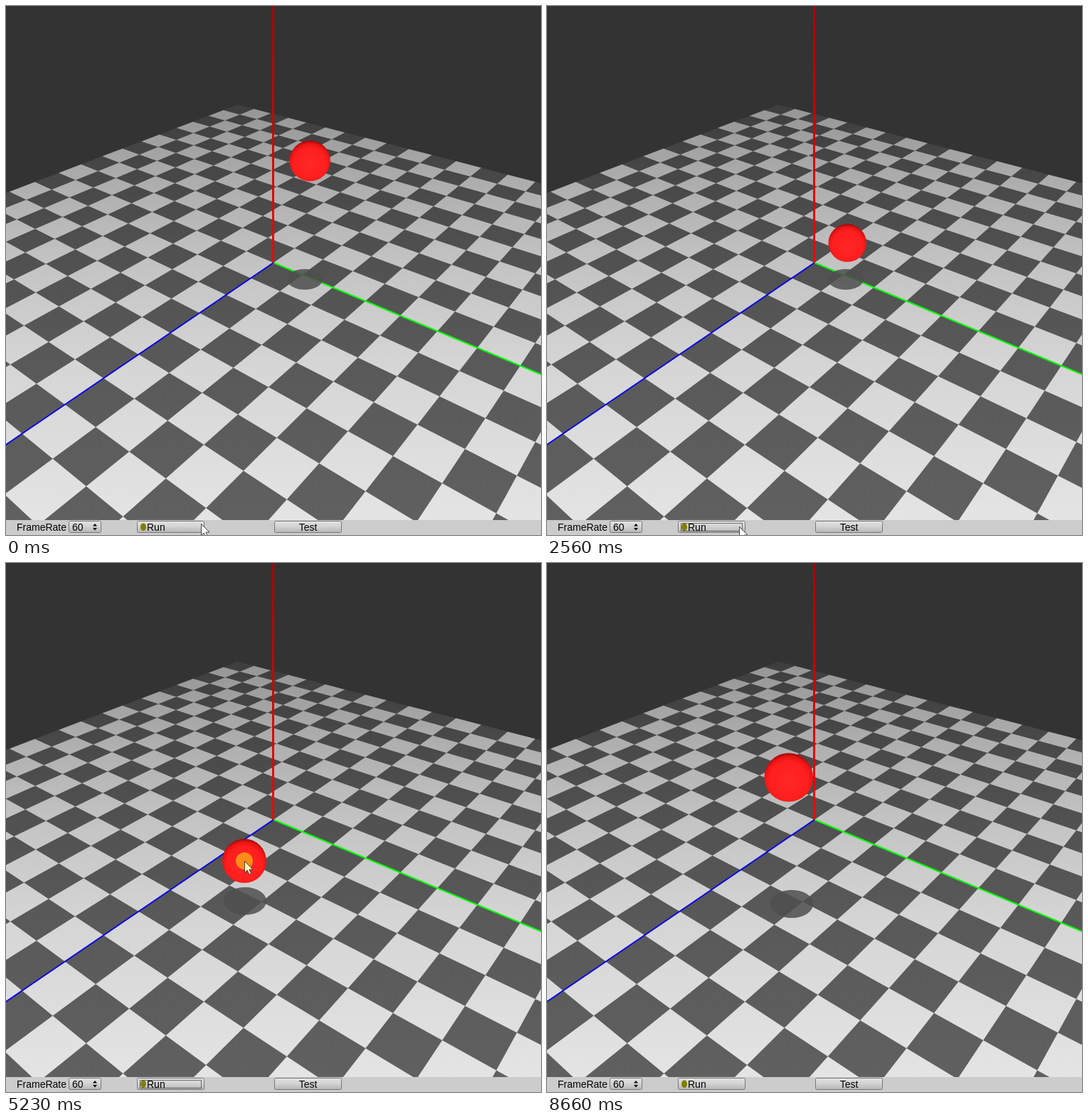
These frames come from a looping animation (752 px wide and 744 px high, 8.76 s). An HTML page with a canvas:

```html
<!DOCTYPE html>
<html lang="en">
<head>
<meta charset="utf-8">
<title>Ball on a checkered floor</title>
<style>
  html, body { margin: 0; width: 100%; height: 100%; overflow: hidden; background: #333; }
  canvas { display: block; }
</style>
</head>
<body>
<canvas id="stage" width="752" height="744"></canvas>
<script>
const LOOP = 8760, TICK = 77.6, RUN = 630;
const stage = document.getElementById('stage');
const scene = document.createElement('canvas');
scene.width = 752;
scene.height = 744;
let ctx = scene.getContext('2d');

// Camera looks at the origin with a 45 degree field of view; u is green, v is blue.
const CAMERA = { u: 9.13, v: 11.65, up: 9.33 };
const FOCAL = 361 / Math.tan(Math.PI / 8);
function project(u, v) {
  const ground = Math.hypot(CAMERA.u, CAMERA.v);
  const distance = Math.hypot(ground, CAMERA.up);
  const side = (u * CAMERA.v - v * CAMERA.u) / ground;
  const toward = (u * CAMERA.u + v * CAMERA.v) / ground;
  const scale = FOCAL / (distance - toward * ground / distance);
  return [376 + side * scale, 361 + toward * CAMERA.up / distance * scale];
}

function addPolygon(points) {
  points.forEach(([x, y], i) => i ? ctx.lineTo(x, y) : ctx.moveTo(x, y));
  ctx.closePath();
}

function addTile(u, v, size) {
  addPolygon([project(u, v), project(u + size, v), project(u + size, v + size), project(u, v + size)]);
}

function verticalGradient(y0, y1, stops) {
  const g = ctx.createLinearGradient(0, y0, 0, y1);
  stops.forEach(([at, color]) => g.addColorStop(at, color));
  return g;
}

function line(x0, y0, x1, y1, color, width) {
  ctx.strokeStyle = color;
  ctx.lineWidth = width;
  ctx.beginPath();
  ctx.moveTo(x0, y0);
  ctx.lineTo(x1, y1);
  ctx.stroke();
}

function ellipse(x, y, rx, ry, color) {
  ctx.fillStyle = color;
  ctx.beginPath();
  ctx.ellipse(x, y, rx, ry, 0, 0, Math.PI * 2);
  ctx.fill();
}

function text(label, x, align = 'left') {
  ctx.font = '14px "Liberation Sans", Arial, sans-serif';
  ctx.textAlign = align;
  ctx.fillStyle = '#000';
  ctx.fillText(label, x, 738);
}

function button(x, width) {
  ctx.beginPath();
  ctx.roundRect(x + 0.5, 724.5, width - 1, 16, 2);
  ctx.fillStyle = verticalGradient(724, 741, [[0, '#e4e4e4'], [0.5, '#d2d2d2'], [1, '#b4b4b4']]);
  ctx.fill();
  ctx.strokeStyle = '#787878';
  ctx.lineWidth = 1;
  ctx.stroke();
}

function drawScene() {
  ctx.fillStyle = '#333';
  ctx.fillRect(0, 0, 752, 744);

  ctx.fillStyle = verticalGradient(139, 723,
    [[0, '#3e3e3e'], [0.2, '#494949'], [0.38, '#515151'], [0.62, '#595959'], [1, '#606060']]);
  ctx.beginPath();
  addTile(-10, -10, 20);
  ctx.fill();

  ctx.fillStyle = verticalGradient(139, 723,
    [[0, '#959595'], [0.2, '#afafaf'], [0.38, '#c3c3c3'], [0.62, '#d5d5d5'], [1, '#e4e4e4']]);
  ctx.beginPath();
  for (let u = -10; u < 10; u++)
    for (let v = -10; v < 10; v++)
      if ((u + v) & 1) addTile(u, v, 1);
  ctx.fill();

  line(...project(0, 0), ...project(10, 0), '#00ff00', 2);
  line(...project(0, 0), ...project(0, 10), '#0000ee', 2);
  line(375.5, 0, 375.5, 361, verticalGradient(0, 361, [[0, '#b00000'], [1, '#f00808']]), 3);

  ctx.fillStyle = '#ccc';
  ctx.fillRect(0, 723, 752, 21);
  button(88, 46);
  button(184, 95);
  button(377, 95);
  text('FrameRate', 15);
  text('60', 93);
  text('Run', 198);
  text('Test', 424.5, 'center');
  ctx.beginPath();
  addPolygon([[122, 731.5], [128, 731.5], [125, 728]]);
  addPolygon([[122, 734], [128, 734], [125, 737.5]]);
  ctx.fill();
}

// Rows are [time, ...values]; values are interpolated and held at both ends.
function sample(track, t) {
  const i = track.findIndex(row => row[0] > t);
  if (i === 0) return track[0].slice(1);
  if (i < 0) return track.at(-1).slice(1);
  const a = track[i - 1], b = track[i];
  const f = (t - a[0]) / (b[0] - a[0]);
  return a.slice(1).map((value, k) => value + (b[k + 1] - value) * f);
}

// Ball x, y, radius, shadow x, y while it is dragged.
const DRAG = [
  [4120, 424, 336, 26.8, 421, 388],
  [5010, 354, 405, 30.3, 354, 458],
  [5205, 335, 419, 31, 336, 475.5],
  [5880, 335, 419, 31, 336, 475.5],
  [6450, 336.5, 333.5, 33.4, 340.3, 477.5],
  [6760, 338.7, 305, 34.1, 343, 479],
  [6915, 339.7, 301.5, 34.3, 344, 479.5]
];
const POINTER = [
  [2800, 270, 732], [3656, 427, 347], [3800, 426, 346], [3960, 426, 342],
  [7500, 340, 301], [7970, 592, 735]
];

// Free fall, one bounce, then the simulation is stopped in mid-air.
function ballHeight(t) {
  const top = 3.34, rest = 0.5, bounce = 1450, g = 9.5;
  const s = (Math.min(t, 2523) - bounce) / 1000;
  if (s > 0) return rest + 5.68 * s - g / 2 * s * s;
  const fallen = Math.max(0, s + Math.sqrt(2 * (top - rest) / g));
  return top - g / 2 * fallen * fallen;
}

function ballState(t, tick) {
  if (t >= 4140) return sample(DRAG, tick);
  const z = ballHeight(tick);
  const w = 0.958 - 0.0395 * z;
  const y = 361 + (22 - 42 * z) / w;
  return [375 + 43.1 / w, y, 32.5 - 0.0174 * y, 420, 384.5];
}

function drawBall([x, y, r, sx, sy], held) {
  const grow = (sy - 384.5) * 0.055;
  ellipse(sx, sy, 25 + grow, 14.5 + grow, 'rgba(79,79,79,.85)');
  const cy = y + r * 0.15;
  const shade = ctx.createRadialGradient(x, cy, 0, x, cy, r * 1.15);
  shade.addColorStop(0, '#ff2828');
  shade.addColorStop(0.7, '#ff1e1e');
  shade.addColorStop(0.87, '#e81414');
  shade.addColorStop(1, '#9c0808');
  ellipse(x, y, r, r, shade);
  if (held) ellipse(x, y, 12, 12, '#ff8c18');
}

function drawRunState(t) {
  if (t >= RUN && t < 2560) {
    ctx.fillStyle = '#ffff00';
    ctx.beginPath();
    ctx.roundRect(189, 728, 9, 10, 2);
    ctx.fill();
  } else {
    ellipse(193, 732.7, 4, 5.5, '#808000');
  }
  if (t >= RUN && t < 8660) {
    ctx.strokeStyle = '#000';
    ctx.lineWidth = 1;
    ctx.setLineDash([1, 1]);
    ctx.strokeRect(188.5, 727.5, 86, 11);
    ctx.setLineDash([]);
  }
}

function drawPointer(x, y, color) {
  ctx.save();
  ctx.translate(x, y);
  ctx.beginPath();
  addPolygon([[0.5, 0.5], [0.5, 16.5], [4.2, 13], [7, 19], [9.6, 17.8], [6.9, 12], [12, 12]]);
  ctx.fillStyle = color;
  ctx.fill();
  ctx.strokeStyle = '#444';
  ctx.lineWidth = 1;
  ctx.stroke();
  ctx.restore();
}

function draw(t) {
  const tick = RUN + Math.floor((t - RUN + 12) / TICK) * TICK;
  const held = t >= 4140 && t < 7120;
  const ball = ballState(t, tick);
  ctx.drawImage(scene, 0, 0);
  drawBall(ball, held);
  drawRunState(t);
  if (t < 8040) {
    const [x, y] = t < 80 ? [274, 728] : held ? ball : sample(POINTER, tick);
    drawPointer(x, y, held ? '#ffffb8' : '#fff');
  }
}

drawScene();
ctx = stage.getContext('2d');
const start = performance.now();
function frame() {
  draw((performance.now() - start) % LOOP);
  requestAnimationFrame(frame);
}
frame();
</script>
</body>
</html>
```
